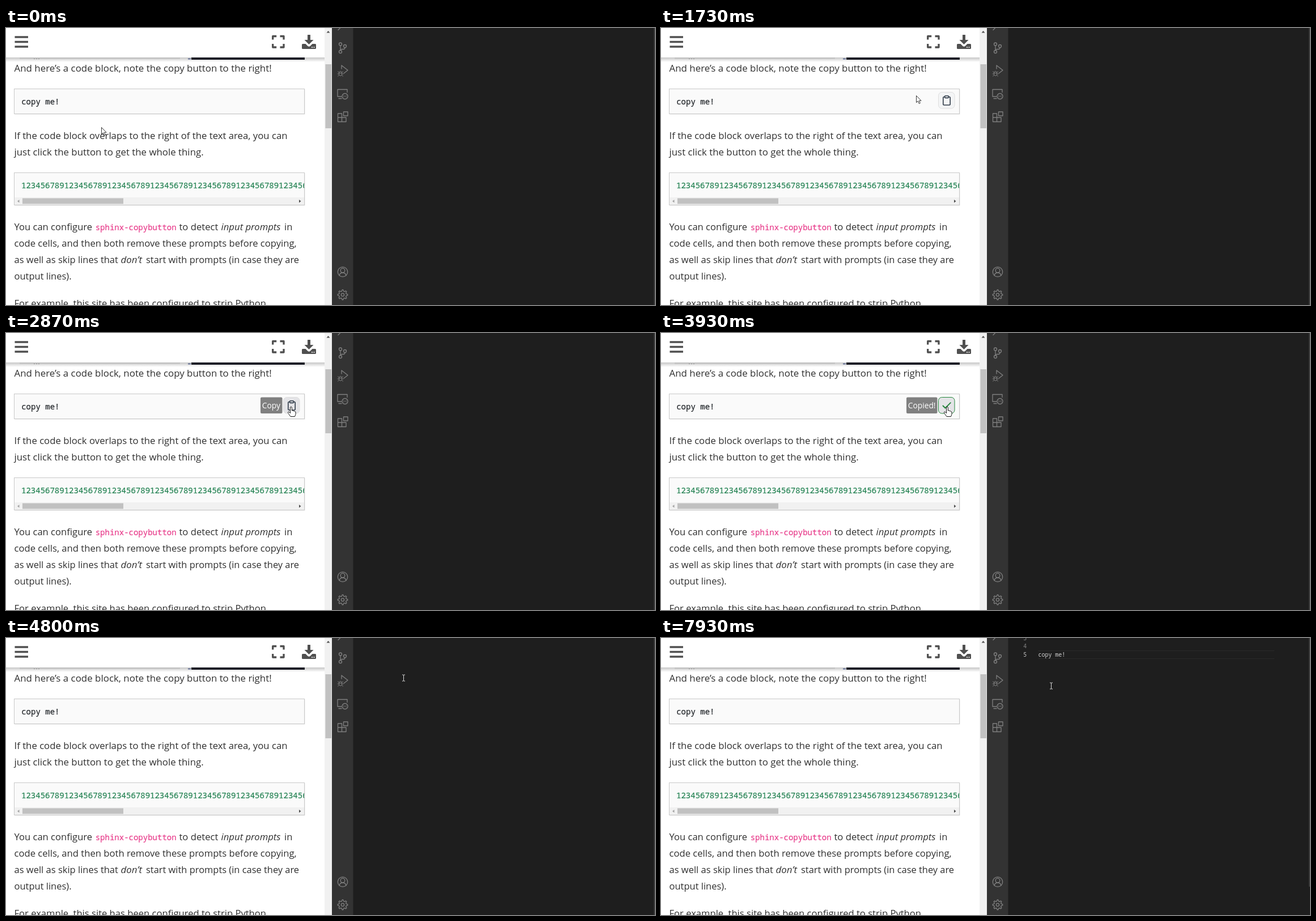
Recreate the animation shown at these times as an HTML page. Size 1145x489 px, loop 8000 ms.

```html
<!DOCTYPE html>
<html lang="en">
<head>
<meta charset="utf-8">
<title>Copy button demo</title>
<style>
  html, body { margin: 0; width: 100%; height: 100%; overflow: hidden; background: #fff; }
  svg { display: block; width: 1145px; height: 489px; }
  text { white-space: pre; fill: currentColor; }
  .prose { font-family: "Open Sans", "Noto Sans", sans-serif; color: #303030; }
  .code { font: 14.02px "Noto Sans Mono", "DejaVu Sans Mono", monospace; stroke: currentColor; stroke-width: .2; }
  .edit { font: 9.95px "Noto Sans Mono", "DejaVu Sans Mono", monospace; }
  .line { fill: none; stroke-linejoin: round; stroke-linecap: round; }
</style>
</head>
<body>
<svg viewBox="0 0 1145 489" xmlns="http://www.w3.org/2000/svg">
  <defs>
    <linearGradient id="shade" x2="0" y2="1">
      <stop stop-color="#000" stop-opacity=".22"/>
      <stop offset="1" stop-color="#000" stop-opacity="0"/>
    </linearGradient>
    <clipPath id="codeClip"><rect x="15" y="256" width="511" height="56"/></clipPath>
    <clipPath id="editorClip"><rect x="612" width="533" height="489"/></clipPath>
  </defs>

  <rect width="1145" height="489" fill="#fff"/>

  <!-- page header and the content scrolled under it -->
  <rect x="24" y="52" width="283" height="3" fill="#f0f0f0"/>
  <path d="M49 54.5h2m2 0h2m2 0h2" stroke="#a8a8a8"/>
  <path d="M321 54.5h5" stroke="#7784b0" stroke-width="2"/>
  <rect x="327" y="52" width="200" height="4" fill="#20222e"/>
  <rect y="52" width="562" height="8" fill="url(#shade)"/>
  <rect width="562" height="52" fill="#fff"/>
  <path d="M15.5 16h23.500M15.500 24.500h23.500M15.500 33h23.500" stroke="#505050" stroke-width="3.400"/>
  <path d="M470.700 20.500v-6h6.500M483.500 14.500h6.500v6M490 28v6h-6.500M477.200 34h-6.500v-6" fill="none" stroke="#505050" stroke-width="3.300" stroke-linejoin="round"/>
  <g fill="#505050">
    <path d="M532 12h5v9h5.500L534.500 29 526.500 21h5.500z"/>
    <path d="M523.500 28h5l4 4q2 1.500 4 0l4-4h5q1.500 0 1.500 1.500v6q0 1.500-1.500 1.500h-22q-1.500 0-1.500-1.500v-6q0-1.500 1.500-1.500z"/>
    <path d="M539 34h2m1.500 0h2" stroke="#fff" stroke-width="1.500"/>
  </g>

  <!-- code blocks -->
  <g id="blocks"></g>
  <text class="code" x="27.200" y="134.500" color="#212529">copy me!</text>
  <g clip-path="url(#codeClip)">
    <text id="digits" class="code" x="27" y="282.500" color="#208050"></text>
  </g>
  <rect x="15" y="299" width="511" height="13" fill="#f1f1f1"/>
  <rect x="29" y="300.500" width="178" height="10" fill="#c1c1c1"/>
  <path d="M23.500 303v5.500L20 305.700z" fill="#a3a3a3"/>
  <path d="M517 303v5.500l3.500-2.800z" fill="#505050"/>
  <g id="prose"></g>
  <text class="code" x="157.700" y="357" color="#e83e8c">sphinx-copybutton</text>

  <!-- page scrollbar -->
  <rect x="562" width="13" height="489" fill="#f1f1f1"/>
  <rect x="563.500" y="64" width="10.500" height="113" fill="#c1c1c1"/>
  <path d="M565.500 8.500h6L568.500 5z" fill="#505050"/>

  <!-- editor -->
  <rect x="575" width="38" height="489" fill="#333"/>
  <rect x="612.500" width="532.500" height="489" fill="#1e1e1e"/>
  <g class="line" stroke="#808080" stroke-width="1.300">
    <path d="M586 3.500l4-4"/>
    <circle cx="590" cy="28.500" r="2.500"/><circle cx="598" cy="32" r="2.500"/><circle cx="590" cy="42" r="2.500"/>
    <path d="M590 31v8.500M598 34.500q0 3-3 3h-2q-3 0-3 2"/>
    <path d="M592 72v-6l11 8.500-7 5.500"/>
    <path d="M587.500 79q0-2.500 2.500-2.500t2.500 2.500v2.500q0 2.800-2.500 2.800t-2.500-2.800zM587.500 79.500h5M585.500 77l2 1.500M594.500 77l-2 1.500M585 81h2.500M592.500 81h2.500M585.500 85l2-1.500M594.500 85l-2-1.500" stroke-width="1"/>
    <path d="M592 121h-7v-12.500h17v5M587 124.500h5"/>
    <circle cx="598" cy="120.500" r="5"/>
    <path d="M595.500 119l1.500 1.500-1.500 1.500M600.500 119l-1.500 1.500 1.500 1.500" stroke-width="1"/>
    <path d="M585.500 151h7v7h7.500v7.500h-14.500zM585.500 158h7v7.500M595.500 148h7.500v7h-7.500z"/>
    <circle cx="594" cy="430.500" r="8.700"/><circle cx="594" cy="428" r="3.800"/>
    <path d="M588 437q1-5 6-5t6 5"/>
    <circle cx="594" cy="471" r="2.600"/>
    <path id="gear"/>
  </g>
  <g clip-path="url(#editorClip)">
    <path id="active" stroke="#2a2a2a" fill="none"/>
    <g id="numbers"></g>
    <text id="pasted" class="edit" x="665.500" y="33" color="#d4d4d4">copy me!</text>
    <rect id="caret" width="1.500" height="14.500" fill="#aeafad"/>
    <rect id="slider" x="1143" width="2" fill="#3c3c3c"/>
  </g>

  <!-- copy button and its tooltip -->
  <g id="button">
    <rect id="buttonBox" x="489.500" y="113.500" width="28.500" height="28.500" rx="6"/>
    <g id="clipIcon" class="line" stroke="#2f3a48" stroke-width="1.600">
      <path d="M500.500 121.500h-1q-1.700 0-1.700 1.700v11.100q0 1.700 1.700 1.700h9q1.700 0 1.700-1.700v-11.100q0-1.700-1.700-1.700h-1"/>
      <rect x="500.500" y="119.800" width="7" height="3.600" rx="1.500"/>
    </g>
    <path id="checkIcon" class="line" d="M497.500 128.500l4 4 9.300-9.300" stroke="#22863a" stroke-width="1.900"/>
  </g>
  <g id="tip">
    <rect id="tipBox" y="113.500" height="28.500" rx="2" fill="#808080"/>
    <text id="tipText" class="prose" y="133.300" style="font-size:13.8px;color:#fff"></text>
  </g>

  <!-- pointers, each drawn around its hotspot -->
  <path id="arrow" d="M.500 .500v12l2.800-2.500 2 4.500 2-.900-2-4.300h3.700z" fill="#fff" stroke="#222" stroke-width=".9"/>
  <path id="hand" d="M-1.500 1q0-1.700 1.400-1.700T1.300 1v5q2.500-1 2.700 .8 2.200-.8 2.500 .9 1.500-.2 1.500 1.300v3.500l-1.500 4h-7.500l-3.500-5q-2-2.500-.7-3.200t2.200 .8l1.500 1.500z" fill="#fff" stroke="#111" stroke-width=".95"/>
  <path id="beam" d="M-2.500-5.500h2l.5 .5 .5-.5h2M0-5v10M-2.500 5.500h2l.5-.5 .5 .5h2" fill="none" stroke="#ddd" stroke-width="1"/>
</svg>
<script>
const LOOP = 8000, TICKS_PER_MS = 0.015, ROW = 14.7;
const $ = id => document.getElementById(id);

function add(parent, tag, attrs, content = "") {
  const node = document.createElementNS("http://www.w3.org/2000/svg", tag);
  set(node, attrs);
  node.textContent = content;
  return parent.appendChild(node);
}
function set(node, attrs) {
  for (const key in attrs) node.setAttribute(key, attrs[key]);
}
const show = (id, on) => set($(id), { visibility: on ? "visible" : "hidden" });
const clamp = v => Math.max(0, Math.min(1, v));
const ramp = (t, from, to) => clamp((t - from) / (to - from));
const smooth = p => p * p * (3 - 2 * p);
const mix = (a, b, p) => a + (b - a) * p;

const PROSE = [
  [14.5, 77, 16.9, "And here’s a code block, note the copy button to the right!"],
  [14.5, 196, 16.75, "If the code block overlaps to the right of the text area, you can"],
  [14.5, 225, 16.85, "just click the button to get the whole thing."],
  [14.5, 357, 16.6, "You can configure"],
  [305.5, 357, 16.65, "to detect"],
  [379.5, 357, 16.7, "input prompts", "italic"],
  [491, 357, 16.6, "in"],
  [14.5, 386, 16.65, "code cells, and then both remove these prompts before copying,"],
  [14.5, 415, 16.5, "as well as skip lines that"],
  [202.5, 415, 17, "don’t", "italic"],
  [247, 415, 16.45, "start with prompts (in case they are"],
  [14.5, 443.5, 16.5, "output lines)."],
  [14.5, 492, 16.6, "For example, this site has been configured to strip Python"]
];
for (const [x, y, size, words, style = "normal"] of PROSE) {
  add($("prose"), "text", { x, y, class: "prose", "font-size": size, "font-style": style }, words);
}

for (const [y, height] of [[107.5, 44], [255.5, 57]]) {
  add($("blocks"), "rect", { x: 15.5, y: y + 1, width: 512, height, fill: "#e2e2e2" });
  add($("blocks"), "rect", { x: 14.5, y, width: 512, height, fill: "#fafafa", stroke: "#c9c9c9" });
}
$("digits").textContent = "123456789".repeat(8);

let gear = "";
for (let i = 0; i <= 32; i++) {
  const r = i % 4 < 2 ? 8.8 : 6.4, a = (i - 0.5) * Math.PI / 16;
  gear += (i ? "L" : "M") + (594 + r * Math.cos(a)).toFixed(2) + " " + (471 + r * Math.sin(a)).toFixed(2);
}
set($("gear"), { d: gear });

const rowTop = line => 22 - (5 - line) * ROW;
const numbers = [3, 4, 5].map(line => ({
  line,
  node: add($("numbers"), "text", { x: 639.3, y: rowTop(line) + 11, class: "edit" }, line)
}));

function pointerAt(t) {
  if (t < 1900) {
    const p = ramp(t, 1000, 1867);
    return [mix(168, 468, smooth(p)), mix(175, 118.5, smooth(clamp(p * 1.15)))];
  }
  if (t < 3900) {
    const p = smooth(ramp(t, 1867, 2267));
    return [mix(468, 503, p), mix(119, 131, p)];
  }
  if (t < 4270) {
    const p = ramp(t, 3867, 4267);
    return [mix(503, 531, p ** 1.4), 131 + p];
  }
  if (t < 7930) {
    const p = smooth(ramp(t, 4267, 4733));
    return [mix(531, 701, p), mix(132, 69.5, p)];
  }
  return [688, 83.5];
}

function drawPointer(x, y) {
  const overButton = x >= 490 && x <= 518 && y >= 113 && y <= 142;
  const kind = x > 612 ? "beam" : overButton ? "hand" : "arrow";
  for (const id of ["arrow", "hand", "beam"]) show(id, id === kind);
  const snap = kind === "beam" ? 0.5 : 0;
  set($(kind), { transform: `translate(${Math.round(x) + snap} ${Math.round(y) + snap})` });
  return overButton;
}

function drawButton(t, hovered) {
  const copied = t >= 2930 && t < 4430;
  const green = copied ? ramp(t, 2900, 3200) : 0;
  set($("button"), { opacity: ramp(t, 1370, 1670) * (1 - ramp(t, 4400, 4730)) });
  set($("buttonBox"), {
    fill: hovered ? "#e4e4e7" : copied ? "#f0f0f0" : "#f4f5f6",
    stroke: copied ? `rgb(${mix(222, 34, green)},${mix(222, 134, green)},${mix(222, 58, green)})` : "#dedede"
  });
  show("clipIcon", !copied);
  show("checkIcon", copied);

  const left = t < 2930 ? 449 : 433;
  const opacity = smooth(ramp(t, 2550, 2800)) * (1 - ramp(t, 4030, 4230));
  set($("tip"), { opacity, transform: `translate(${opacity - 1} 0)` });
  set($("tipBox"), { x: left, width: 487.5 - left });
  set($("tipText"), { x: left + 2.7 });
  $("tipText").textContent = t < 2930 ? "Copy" : "Copied!";
}

function drawEditor(t) {
  const line = t < 5670 ? 1 : t < 6270 ? 2 : t < 6600 ? 3 : t < 6730 ? 4 : 5;
  const top = rowTop(line);
  set($("active"), { d: `M665.5 ${Math.round(top) + 0.5}H1082M665.5 ${Math.round(top + ROW) - 0.5}H1082` });
  for (const n of numbers) {
    set(n.node, { color: n.line === line ? "#c6c6c6" : "#858585", visibility: n.line <= line ? "visible" : "hidden" });
  }
  show("pasted", t >= 7070);
  show("caret", t >= 6600 && t < 7530);
  set($("caret"), { x: t < 7070 ? 665.5 : 713.3, y: top });
  set($("slider"), { height: t < 5670 ? 489 : t < 6400 ? 465 : t < 6600 ? 452 : 439 });
}

function render(t) {
  const stepped = Math.floor(t * TICKS_PER_MS + 0.1) / TICKS_PER_MS;
  const hovered = drawPointer(...pointerAt(stepped + 4));
  drawButton(t, hovered);
  drawEditor(t);
}

const start = performance.now();
function frame() {
  render((performance.now() - start) % LOOP);
  requestAnimationFrame(frame);
}
frame();
</script>
</body>
</html>
```
